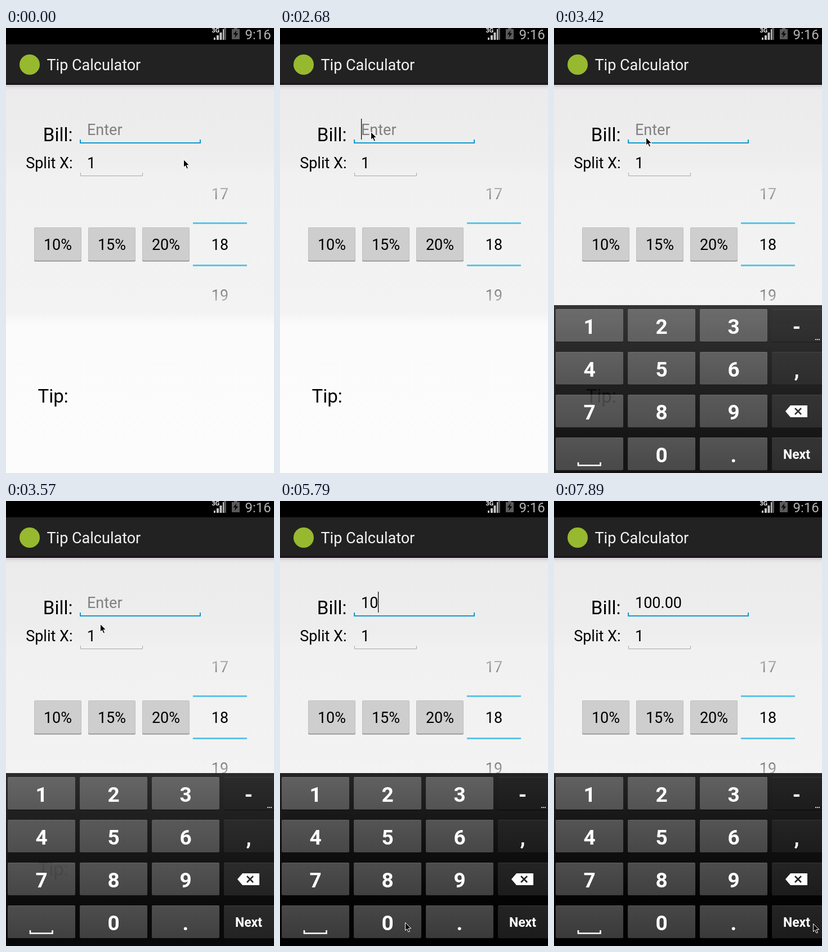
An HTML page for the animation above (8 s loop, 476x790 px).

```html
<!DOCTYPE html>
<html lang="en">
<head>
<meta charset="utf-8">
<title>Tip Calculator</title>
<style>
  html, body { margin: 0; width: 100%; height: 100%; overflow: hidden; background: #fbfbfb; }
  svg { display: block; width: 476px; height: 790px; }
  text { font: 27px Roboto, sans-serif; }
  .big { font-size: 33px; }
  .mid { text-anchor: middle; }
  #keys text { font-weight: 700; font-size: 37px; fill: #fff; text-anchor: middle; }
  #keys .small { font-size: 23px; }
</style>
</head>
<body>
<svg viewBox="0 0 476 790">
  <defs>
    <linearGradient id="page" gradientUnits="userSpaceOnUse" x1="0" y1="100" x2="0" y2="790">
      <stop offset="0" stop-color="#ebebeb"/>
      <stop offset=".2" stop-color="#eeeeee"/>
      <stop offset=".235" stop-color="#f1f1f1"/>
      <stop offset=".585" stop-color="#f3f3f3"/>
      <stop offset=".622" stop-color="#fbfbfb"/>
      <stop offset="1" stop-color="#fcfcfc"/>
    </linearGradient>
    <linearGradient id="fadeUp" gradientUnits="userSpaceOnUse" x1="0" y1="284" x2="0" y2="306">
      <stop offset="0" stop-color="#b0b0b0"/><stop offset="1" stop-color="#808080"/>
    </linearGradient>
    <linearGradient id="fadeDown" gradientUnits="userSpaceOnUse" x1="0" y1="464" x2="0" y2="486">
      <stop offset="0" stop-color="#7c7c7c"/><stop offset="1" stop-color="#b4b4b4"/>
    </linearGradient>
    <linearGradient id="board" x2="0" y2="1">
      <stop offset="0" stop-color="#242424"/><stop offset=".35" stop-color="#131313"/>
      <stop offset=".75" stop-color="#030303"/><stop offset="1" stop-color="#000"/>
    </linearGradient>
    <linearGradient id="pressed" x2="0" y2="1">
      <stop offset="0" stop-color="#747474"/><stop offset="1" stop-color="#929292"/>
    </linearGradient>
  </defs>

  <rect width="476" height="790" fill="url(#page)"/>
  <rect width="476" height="29"/>
  <rect y="29" width="476" height="70" fill="#222"/>
  <rect y="97.5" width="476" height="3.5" fill="#1b161d"/>
  <rect y="101" width="476" height="4" fill="#d9d5da"/>
  <rect y="105" width="476" height="4" fill="#e6e5e6"/>

  <!-- status bar -->
  <g fill="#c4c4c4">
    <path d="M369 21V17H372V21ZM374 21V13H378V21ZM379.5 21V8H383.5V21ZM385 21V2H387V21Z"/>
    <path d="M387 21V0H391V21Z" fill="#555"/>
    <text x="365.500" y="8" style="font-size:11px;font-weight:700" fill="#eee">3G</text>
    <path d="M401 2H405V0H411V2H415V20H401Z" fill="#5a5a5a"/>
    <path d="M409.500 4L403.500 11.500H407.500L406 17.500 412.500 9.500H408.500Z" fill="#0a0a0a"/>
    <text x="424.500" y="19.500" style="font-size:24px" fill="#b4b4b4">9:16</text>
  </g>

  <!-- title -->
  <circle cx="42" cy="65" r="18" fill="#97b92f"/>
  <text x="72.500" y="75" fill="#f3f3f3">Tip Calculator</text>

  <!-- form -->
  <text class="big" x="118.500" y="201" text-anchor="end">Bill:</text>
  <text x="118.500" y="249" text-anchor="end">Split X:</text>
  <text id="bill" x="144" y="190"></text>
  <rect id="caret" y="161" width="1.200" height="37"/>
  <path d="M132 198V204H345V198" fill="none" stroke="#1299cd" stroke-width="2"/>
  <text x="144" y="249">1</text>
  <path d="M132.500 257V262.500H242.500V257" fill="none" stroke="#a6a6a6"/>
  <g id="buttons"></g>

  <!-- picker -->
  <path d="M332 346.500H428M332 421.500H428" stroke="#5cc4e9" stroke-width="3"/>
  <text class="mid" x="380" y="304" fill="url(#fadeUp)">17</text>
  <text class="mid" x="380" y="394">18</text>
  <text class="mid" x="380" y="484" fill="url(#fadeDown)">19</text>
  <text class="big" x="56.500" y="665">Tip:</text>

  <g id="keys">
    <rect y="483" width="476" height="307" fill="url(#board)"/>
  </g>
  <path id="cursor" d="M.5.5V14.500L3.700 11.500 6 17 8.500 16 6.200 10.700H10.700Z" stroke="#fff" stroke-width="1"/>
</svg>

<script>
const LOOP = 8000, TICK = 148.5;
const $ = id => document.getElementById(id);

function add(parent, tag, attrs, text = '') {
  const el = document.createElementNS('http://www.w3.org/2000/svg', tag);
  for (const k in attrs) el.setAttribute(k, attrs[k]);
  el.textContent = text;
  parent.append(el);
  return el;
}

['10%', '15%', '20%'].forEach((label, i) => {
  const x = 50 + 96 * i, g = $('buttons');
  add(g, 'rect', { x, y: 355, width: 84, height: 59.5, rx: 2, fill: '#8e8e8e' });
  add(g, 'rect', { x, y: 354, width: 84, height: 59, rx: 2, fill: '#c0c0c0' });
  add(g, 'rect', { x: x + 1, y: 355, width: 82, height: 57.5, rx: 1, fill: '#cecece' });
  add(g, 'text', { x: x + 42, y: 394, class: 'mid' }, label);
});

// Keypad: four rows, the last column is darker and runs off the edge.
const keyFaces = {};
const shade = v => `rgb(${v},${v},${v})`;
['123-', '456,', '789<', '_0.>'].forEach((row, r) => [...row].forEach((ch, c) => {
  const g = $('keys'), x = 3 + 128 * c, y = 490 + 76 * r, width = c < 3 ? 120 : 94;
  const top = c < 3 ? [96, 84, 77, 71][r] : 36, low = c < 3 ? top - 13 : 28;
  const id = 'face' + r + c;
  const grad = add(g, 'linearGradient', { id, x2: 0, y2: 1 });
  add(grad, 'stop', { offset: 0, 'stop-color': shade(top) });
  add(grad, 'stop', { offset: 1, 'stop-color': shade(low) });
  add(g, 'rect', { x, y: y + 1, width, height: 58, rx: 2, fill: '#070707' });
  add(g, 'rect', { x, y, width, height: 57.5, rx: 2, fill: shade(top + 18) });
  const face = add(g, 'rect', { x, y: y + 1, width, height: 56.5, rx: 2, fill: `url(#${id})` });
  keyFaces[ch] = { face, fill: `url(#${id})` };
  const cx = c < 3 ? x + 60 : 431;
  if (ch === '_') {
    add(g, 'path', { d: 'M43 762V767.5H82.5V762', fill: 'none', stroke: '#fff', 'stroke-width': 2.6 });
  } else if (ch === '<') {
    add(g, 'path', { d: 'M411 671.5L420 661H450V682H420Z', fill: '#fff' });
    add(g, 'path', { d: 'M428 666L439 677M439 666L428 677', stroke: '#222', 'stroke-width': 2.6 });
  } else if (ch === '>') {
    add(g, 'text', { x: cx, y: 756, class: 'small' }, 'Next');
  } else {
    add(g, 'text', { x: cx, y: y + 43.5 }, ch);
  }
}));
add($('keys'), 'path', { d: 'M464 544H472', stroke: '#ccc', 'stroke-width': 2, 'stroke-dasharray': '2 1' });

// Pointer path: tick, x, y
const path = [
  [0, 315, 233], [1, 296, 228], [3, 214, 202], [5, 160, 182], [8, 161, 182], [9, 161, 183],
  [11, 161, 184], [22, 161, 184], [23, 163, 194], [24, 167, 218], [25, 170, 275], [26, 165, 380],
  [27, 148, 450], [28, 105, 508], [29, 77, 524], [31, 75, 522], [35, 75, 522], [36, 110, 600],
  [37, 185, 715], [38, 222, 748], [42, 222, 748], [43, 250, 751], [45, 295, 751], [46, 295, 751],
  [48, 252, 750], [51, 252, 750], [52, 350, 752], [53, 460, 750]
];
const typed = [[35, '1', 159], [39, '10', 174], [42, '100', 188], [46, '100.', 196], [49, '100.0', 211], [50, '100.00', 226]];
const caretOn = [[4, 8], [11, 15], [18, 22], [25, 29], [32, 53]];
const presses = [['1', 34, 35], ['0', 38, 39], ['0', 41, 42], ['0', 48, 50]];
// Keypad entry: tick, drop, opacity
const entry = [[0, 0, 0], [22, 74, .5], [23, 9, .92], [24, 0, .965], [25, 0, 1]];

const latest = (list, n) => list.filter(e => e[0] <= n).pop();
const during = (n, a, b) => n >= a && n < b;

function pointer(n) {
  const i = path.findIndex(p => p[0] >= n);
  if (i < 1) return i ? path[path.length - 1].slice(1) : path[0].slice(1);
  const a = path[i - 1], b = path[i], k = (n - a[0]) / (b[0] - a[0]);
  return [1, 2].map(j => Math.round(a[j] + (b[j] - a[j]) * k));
}

function draw(t) {
  const n = Math.floor((t + 5) / TICK);
  const [, value, end] = latest(typed, n) || [0, '', 144];
  $('bill').textContent = value || 'Enter';
  $('bill').setAttribute('fill', value ? '#000' : '#808080');
  $('caret').setAttribute('x', end);
  $('caret').style.opacity = caretOn.some(([a, b]) => during(n, a, b)) ? 1 : 0;
  $('cursor').setAttribute('transform', `translate(${pointer(n)})`);
  const [, drop, alpha] = latest(entry, n);
  $('keys').setAttribute('transform', `translate(0 ${drop})`);
  $('keys').style.opacity = alpha;
  for (const ch of '10') {
    const down = presses.some(([key, a, b]) => key === ch && during(n, a, b));
    keyFaces[ch].face.setAttribute('fill', down ? 'url(#pressed)' : keyFaces[ch].fill);
  }
}

const start = performance.now();
function loop() {
  draw((performance.now() - start) % LOOP);
  requestAnimationFrame(loop);
}
loop();
</script>
</body>
</html>
```
